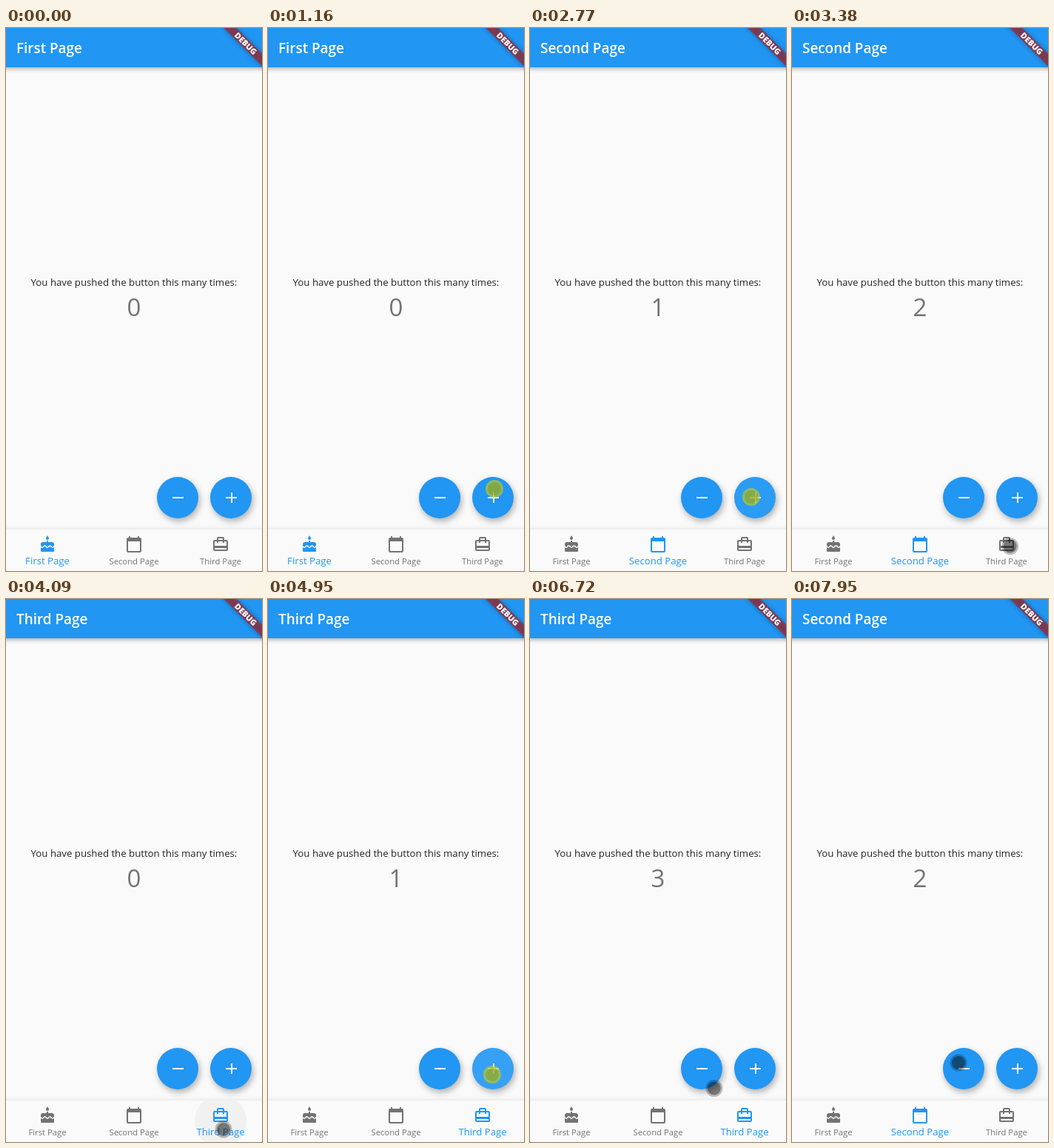
These frames come from a looping animation (346 by 733 pixels, 8000 ms). An HTML page with a canvas:

```html
<!DOCTYPE html>
<html lang="en">
<head>
<meta charset="utf-8">
<title>Counter pages</title>
<style>
  html, body { margin: 0; width: 100%; height: 100%; overflow: hidden; background: #fafafa; }
  canvas { display: block; }
</style>
</head>
<body>
<canvas id="stage" width="346" height="733"></canvas>
<script>
const ctx = document.getElementById('stage').getContext('2d');
const W = 346, H = 733, LOOP = 8000;
const BAR = 53, NAV = 677, MIDDLE = W / 2;
const BLUE = '#2196f3', PAPER = '#fafafa';
const FONT = '"Open Sans", "Noto Sans", sans-serif';
const GLIDE = 330, HOLD = 90, FADE = 300;

const clamp = v => Math.max(0, Math.min(1, v));
const mix = (a, b, k) => a + (b - a) * k;
const smooth = k => k * k * (3 - 2 * k);

const pages = [
  { name: 'First Page', icon: cakeIcon },
  { name: 'Second Page', icon: calendarIcon },
  { name: 'Third Page', icon: bagIcon }
];

// The pointer glides between the plus button, the tabs and the minus button.
const glides = [
  { start: 290, x: 306, y: 622 },
  { start: 1440, x: 190.5, y: 706 },
  { start: 2080, x: 299, y: 633 },
  { start: 3130, x: 294, y: 716 },
  { start: 4090, x: 303, y: 642 },
  { start: 6570, x: 179, y: 707 },
  { start: 7650, x: 226, y: 625 }
];
const taps = [1160, 1940, 2480, 2745, 3790, 4630, 4900, 5810, 7560];

function pointerAt(t) {
  let from = { x: 306, y: H + 12 };
  for (const to of glides) {
    if (t < to.start + GLIDE) {
      const k = smooth(clamp((t - to.start) / GLIDE));
      return { x: mix(from.x, to.x, k), y: mix(from.y, to.y, k) - 10 * Math.sin(Math.PI * k) };
    }
    from = to;
  }
  return from;
}

// A tap on the bar opens the tab under the pointer, any other tap counts on the open page.
function stateAt(t) {
  const state = { page: 0, previous: 0, opened: -LOOP, counts: [0, 0, 0], press: 0 };
  for (const down of taps) {
    const { x, y } = pointerAt(down), up = down + HOLD;
    if (y < NAV) {
      const glow = Math.min(clamp((t - down) / 70), clamp(1 - (t - up) / FADE));
      state.press = Math.max(state.press, glow);
      if (t >= up) state.counts[state.page]++;
    } else if (t >= up) {
      state.previous = state.page;
      state.page = Math.floor(x / W * pages.length);
      state.opened = up;
    }
  }
  return state;
}

function disc(x, y, r, fill) {
  ctx.fillStyle = fill;
  ctx.beginPath();
  ctx.arc(x, y, r, 0, Math.PI * 2);
  ctx.fill();
}

function box(x, y, w, h, radius) {
  ctx.beginPath();
  ctx.roundRect(x, y, w, h, radius);
}

function text(str, x, y, size, color, align = 'center', weight = 400) {
  ctx.font = `${weight} ${size}px ${FONT}`;
  ctx.textAlign = align;
  ctx.fillStyle = color;
  ctx.fillText(str, x, y);
}

function raised(elevation, paint) {
  ctx.save();
  ctx.shadowColor = 'rgba(0,0,0,0.3)';
  ctx.shadowOffsetX = elevation / 3;
  ctx.shadowOffsetY = elevation * 2 / 3;
  ctx.shadowBlur = elevation * 1.38;
  paint();
  ctx.restore();
}

// Icons are drawn on a 24 by 24 grid.
function cakeIcon() {
  disc(12, 4, 2, ctx.fillStyle);
  ctx.beginPath();
  ctx.moveTo(12, 0);
  ctx.lineTo(13.8, 3.2);
  ctx.lineTo(10.2, 3.2);
  ctx.fill();
  ctx.fillRect(11, 7, 2, 3);
  box(3, 9, 18, 13, [3, 3, 1, 1]);
  ctx.fill();
  ctx.beginPath();
  for (let x = 2; x <= 22; x += 0.5) {
    ctx.lineTo(x, 15.05 + 1.15 * Math.cos((x - 12) / 7 * Math.PI * 2));
  }
  ctx.strokeStyle = PAPER;
  ctx.lineWidth = 1.5;
  ctx.stroke();
}

function calendarIcon() {
  box(3, 4, 18, 18, 1);
  ctx.stroke();
  ctx.fillRect(3, 4, 18, 4);
  for (const x of [5, 17]) ctx.fillRect(x, 1, 2, 3);
}

function bagIcon() {
  box(3, 7, 18, 13, 1);
  ctx.stroke();
  box(8, 3, 8, 4, 1);
  ctx.stroke();
  ctx.fillRect(3, 14, 18, 3);
  for (const x of [7, 15]) ctx.fillRect(x, 7, 2, 3);
}

function drawBanner() {
  ctx.save();
  ctx.translate(W + 2, -3);
  ctx.rotate(Math.PI / 4);
  ctx.shadowColor = 'rgba(0,0,0,0.5)';
  ctx.shadowBlur = 6;
  ctx.fillStyle = 'rgba(183,28,28,0.63)';
  ctx.fillRect(-40, 28, 80, 12);
  ctx.shadowColor = 'transparent';
  text('DEBUG', 0, 37.8, 10.8, '#fff', 'center', 800);
  ctx.restore();
}

function drawAppBar(title) {
  raised(4, () => {
    ctx.fillStyle = BLUE;
    ctx.fillRect(-20, -20, W + 40, BAR + 20);
  });
  text(title, 14, 34, 18.9, '#fff', 'left', 600);
}

function drawButton(x, isPlus, press) {
  const y = 634;
  raised(6, () => disc(x, y, 28, BLUE));
  disc(x, y, 28, `rgba(255,255,255,${0.13 * press})`);
  ctx.fillStyle = '#fff';
  ctx.fillRect(x - 7, y - 1, 15, 2);
  if (isPlus) ctx.fillRect(x, y - 7, 2, 14);
}

function drawNav(age, page, previous) {
  const tabX = i => MIDDLE + 117 * (i - 1);
  raised(8, () => {
    ctx.fillStyle = PAPER;
    ctx.fillRect(-30, NAV, W + 60, H);
  });
  if (age < FADE) {
    ctx.save();
    ctx.beginPath();
    ctx.rect(0, NAV, W, H - NAV);
    ctx.clip();
    disc(tabX(page), 705, 36 * Math.sqrt(clamp(age / 220)),
      `rgba(0,0,0,${0.04 * clamp((FADE - age) / 100)})`);
    ctx.restore();
  }
  const k = smooth(clamp(age / 200));
  pages.forEach(({ name, icon }, i) => {
    const on = i === page ? k : i === previous ? 1 - k : 0;
    const color = `rgb(${mix(115, 33, on)},${mix(115, 150, on)},${mix(115, 243, on)})`;
    ctx.save();
    ctx.translate(tabX(i) - 12, 685);
    ctx.fillStyle = ctx.strokeStyle = color;
    ctx.lineWidth = 2;
    icon();
    ctx.restore();
    text(name, tabX(i), 724, mix(11.3, 13.2, on), color);
  });
}

function drawPointer(t) {
  const { x, y } = pointerAt(t);
  if (taps.some(down => t >= down && t < down + HOLD)) {
    disc(x, y, 12, 'rgba(190,200,40,0.7)');
    disc(x, y, 9, 'rgba(110,140,20,0.35)');
  } else {
    disc(x, y, 11.5, 'rgba(0,0,0,0.24)');
    disc(x, y, 9, 'rgba(0,0,0,0.36)');
  }
}

function draw(t) {
  const { page, previous, opened, counts, press } = stateAt(t);
  ctx.fillStyle = PAPER;
  ctx.fillRect(0, 0, W, H);
  text('You have pushed the button this many times:', MIDDLE, 348, 13.23, 'rgba(0,0,0,0.87)');
  text(counts[page], MIDDLE, 389, 33, 'rgba(0,0,0,0.54)');
  drawAppBar(pages[page].name);
  drawNav(t - opened, page, previous);
  drawButton(232, false, 0);
  drawButton(304, true, press);
  drawBanner();
  drawPointer(t);
}

const start = performance.now();
function tick() {
  draw((performance.now() - start) % LOOP);
  requestAnimationFrame(tick);
}
tick();
</script>
</body>
</html>
```
